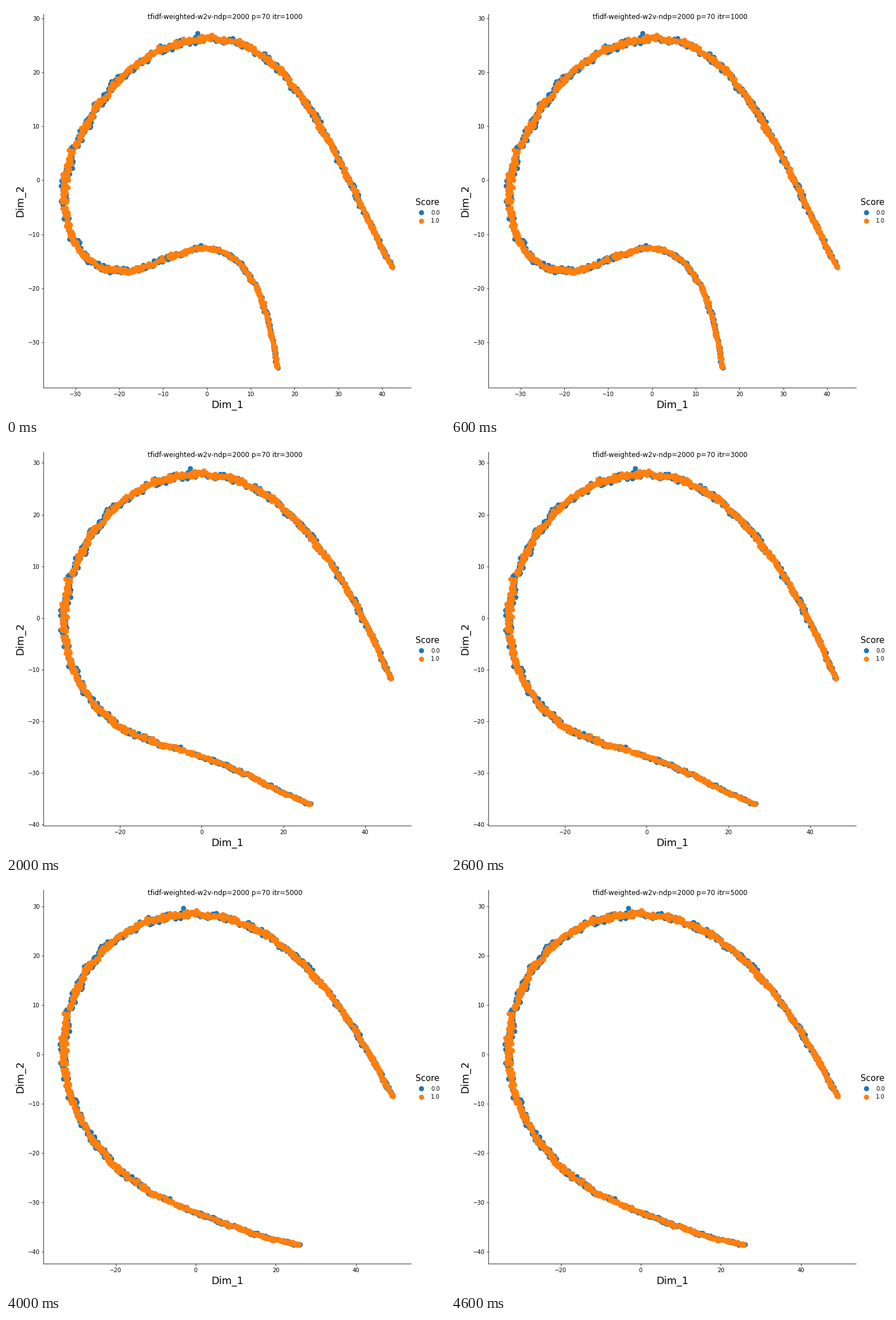
Recreate the animation shown at these times as a matplotlib script. Size 775 by 723 pixels, loop 5 s.

```python
import numpy as np
import matplotlib.pyplot as plt
from matplotlib.animation import FuncAnimation

W, H, DPI = 775, 723, 72
LEFT, RIGHT, TOP, BOTTOM = 66.4, 715.4, 13.6, 673.4
SIZE = np.array([RIGHT - LEFT, BOTTOM - TOP])
BLUE, ORANGE = "#1f77b4", "#ff7f0e"
STEPS = 5

plt.rcParams["font.family"] = "DejaVu Sans"

# Key points of the curve at the first and last step, in data units
FIRST = np.array([(42.4, -16.4), (38.2, -9.7), (24.2, 12.2), (6.1, 25.7),
                  (-15.1, 22.0), (-27.7, 10.0), (-32.5, -1.3), (-27.9, -14.0),
                  (-16.9, -16.6), (-1.6, -12.6), (9.5, -17.4), (13.9, -25.8),
                  (16.1, -34.8)])
LAST = np.array([(49.3, -8.8), (45.3, -2.8), (27.0, 18.1), (5.4, 28.0),
                 (-16.5, 25.2), (-29.6, 13.4), (-33.0, 0.8), (-29.0, -12.8),
                 (-20.4, -22.4), (-7.1, -29.6), (7.2, -34.2), (16.3, -36.8),
                 (26.0, -38.6)])
XLIM = [(-37.26, 46.64), (-38.53, 49.53), (-38.72, 51.32), (-38.31, 52.56), (-37.99, 53.84)]
YLIM = [(-38.44, 30.83), (-39.85, 31.29), (-40.21, 32.18), (-40.28, 32.87), (-42.48, 33.36)]


def curve(step):
    """Key points at one step, in pixels from the lower left of the axes."""
    s = step / (STEPS - 1)
    k = np.arange(len(FIRST))
    # the right arm settles more slowly than the rest
    ease = 1 - (1 - s) ** np.minimum(1.25 + 0.19 * k, 2)
    pts = FIRST + (LAST - FIRST) * ease[:, None]
    # the left side swings out early, the tail swings right and then lifts
    pts[:, 0] += s * (1 - s)**2 * np.interp(k, [4, 6, 8, 9, 12], [0, -7, -5, 0, 25])
    pts[:, 1] += s**2 * (1 - s) * np.interp(k, [9, 12], [0, 13])
    lo, hi = np.transpose([XLIM[step], YLIM[step]])
    return (pts - lo) / (hi - lo) * SIZE


def spline(knots, values, t):
    """Natural cubic spline through values at knots."""
    n, h = len(knots), np.diff(knots)
    slope = np.diff(values, axis=0) / h[:, None]
    a, rhs = np.eye(n), np.zeros_like(values)
    for i in range(1, n - 1):
        a[i, i - 1:i + 2] = h[i - 1], 2 * (h[i - 1] + h[i]), h[i]
        rhs[i] = 6 * (slope[i] - slope[i - 1])
    m = np.linalg.solve(a, rhs)
    i = np.clip(np.searchsorted(knots, t, side="right") - 1, 0, n - 2)
    u, v, hi = (t - knots[i])[:, None], (knots[i + 1] - t)[:, None], h[i][:, None]
    return ((m[i] * v**3 + m[i + 1] * u**3) / (6 * hi)
            + (values[i] / hi - m[i] * hi / 6) * v
            + (values[i + 1] / hi - m[i + 1] * hi / 6) * u)


CURVES = np.array([curve(i) for i in range(STEPS)])
chords = np.linalg.norm(np.diff(CURVES, axis=1), axis=2).mean(axis=0)
KNOTS = np.append(0, np.cumsum(chords))
LENGTH = KNOTS[-1]


def make_cloud(rng, n, spread):
    """Positions along the curve and offsets across it, thin at both ends."""
    t = rng.uniform(0, LENGTH, n)
    width = 0.7 + 1.9 * np.sin(np.pi * t / LENGTH) ** 0.8
    wobble = 0.35 * np.sin(t / 7.3) + 0.35 * np.sin(t / 11.9 + 1)
    return t, width * (np.clip(rng.normal(0, spread, n), -2.6, 2.6) + wobble)


def place(path, t, off):
    """Cloud positions as axes fractions."""
    ahead = spline(KNOTS, path, np.minimum(t + 1, LENGTH))
    behind = spline(KNOTS, path, np.maximum(t - 1, 0))
    d = ahead - behind
    d /= np.linalg.norm(d, axis=1)[:, None]
    normal = np.column_stack([d[:, 1], -d[:, 0]])
    return (spline(KNOTS, path, t) + normal * off[:, None]) / SIZE


rng = np.random.default_rng(70)
blue_t, blue_off = make_cloud(rng, 850, 1.15)
blue_t[0], blue_off[0] = KNOTS[3] + 60, 11  # lone point above the crest
clouds = [(blue_t, blue_off), make_cloud(rng, 1150, 0.9)]

fig = plt.figure(figsize=(W / DPI, H / DPI), dpi=DPI, facecolor="white")
ax = fig.add_axes([LEFT / W, 1 - BOTTOM / H, SIZE[0] / W, SIZE[1] / H])
ax.spines[["top", "right"]].set_visible(False)
ax.set_xlabel("Dim_1", fontsize=18)
ax.set_ylabel("Dim_2", fontsize=18)

DOT = dict(s=56, linewidths=1.5)
dots = [ax.scatter([], [], color=c, transform=ax.transAxes, **DOT)
        for c in (BLUE, ORANGE)]


def label(x, y, text, size, **kw):
    return fig.text(x / W, 1 - y / H, text, fontsize=size, **kw)


title = label(387, 19.5, "", 12, ha="center", va="center")
label(744.5, 351, "Score", 15, ha="center", va="baseline")

key = fig.add_axes([0, 0, 1, 1], facecolor="none")
key.set(xlim=(0, W), ylim=(H, 0))
key.axis("off")
for y, color, name in ((364, BLUE, "0.0"), (379, ORANGE, "1.0")):
    key.scatter([732.5], [y], color=color, **DOT)
    label(750, y + 3.5, name, 10, va="baseline")


def update(i):
    ax.set(xlim=XLIM[i], ylim=YLIM[i])
    for dot, (t, off) in zip(dots, clouds):
        dot.set_offsets(place(CURVES[i], t, off))
    title.set_text(f"tfidf-weighted-w2v-ndp=2000 p=70 itr={(i + 1) * 1000}")
    return [*dots, title]


anim = FuncAnimation(fig, update, frames=STEPS, interval=1000, repeat=True,
                     repeat_delay=0, blit=False)
plt.show()
```
